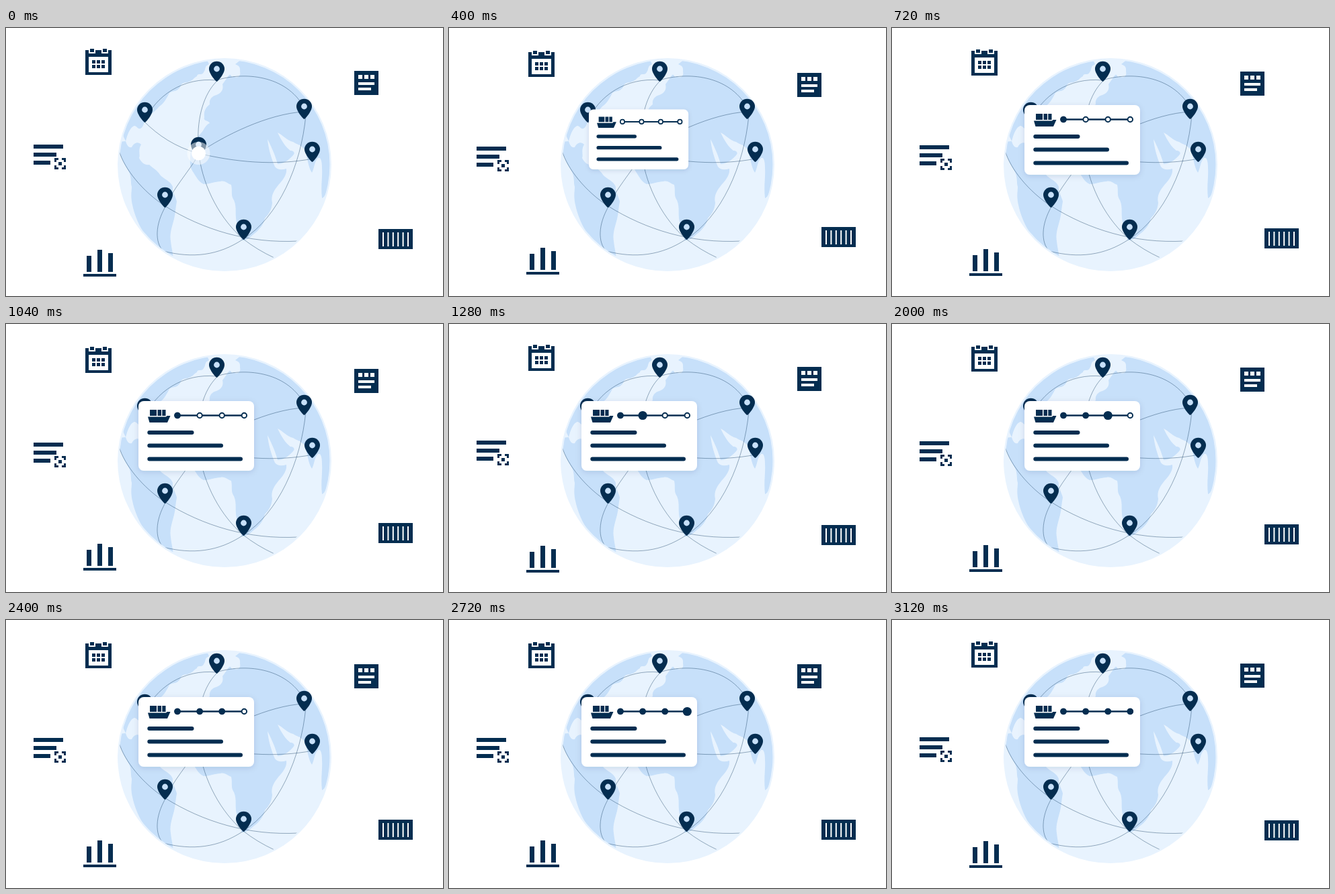
These frames come from a looping animation (650x400 px, 3.2 s). An HTML page:

```html
<!DOCTYPE html>
<html lang="en">
<head>
<meta charset="utf-8">
<title>Shipment tracking</title>
<style>
  html, body { margin: 0; width: 100%; height: 100%; overflow: hidden; background: #fff; }
  svg { display: block; width: 650px; height: 400px; }
  .navy { fill: #042d50; }
  .white { fill: #fff; }
  .land { fill: #c7e0fa; }
  .sea { fill: #e8f3fe; }
  .routes { fill: none; stroke: #042d50; stroke-width: .6; stroke-opacity: .65; }
  .bars { fill: none; stroke: #042d50; stroke-width: 6; stroke-linecap: round; }
</style>
</head>
<body>
<svg viewBox="0 0 650 400" xmlns="http://www.w3.org/2000/svg">
  <defs>
    <clipPath id="disc"><circle cx="325" cy="204" r="156.5"/></clipPath>
    <filter id="shadow" x="-20%" y="-20%" width="140%" height="150%">
      <feDropShadow dx="0" dy="2" stdDeviation="4" flood-color="#042d50" flood-opacity=".13"/>
    </filter>
    <g id="pin">
      <path class="navy" d="M0 18.7C-1.5 18.7-11.5 7-11.5-.2A11.5 11.3 0 0 1 11.5-.2C11.5 7 1.5 18.7 0 18.7Z"/>
      <circle class="land" r="4.4" cy="-.3"/>
    </g>
  </defs>

  <circle class="sea" cx="325" cy="204" r="159"/>
  <g clip-path="url(#disc)">
    <!-- Americas -->
    <path class="land" d="M178 169C181 158 184 150 189 147C193 143 196 152 200 150C206 147 204 140 209 136
      C214 128 222 125 228 117C236 112 239 104 243 97C248 93 254 96 259 88C262 79 268 83 272 80C278 79 279 74 284 72
      C285 66 291 72 294 66C298 61 294 58 302 54L296 40L220 50L160 130Z"/>
    <path class="land" d="M178 169C180 175 182 179 187 178C190 171 197 169 201 174C196 182 200 189 198 194
      C202 202 207 205 213 204C219 210 224 211 229 219C235 226 245 228 248 237C247 246 252 250 254 259
      C252 269 252 277 250 285C247 297 243 307 245 318C246 328 248 334 249 345L225 335C209 316 193 289 188 264
      C185 251 187 244 187 237C185 230 187 223 183 215C177 205 172 196 168 183L165 170Z"/>
    <!-- Europe, Africa and Asia -->
    <path class="land" d="M341 54C345 56 349 57 348 65C350 72 343 76 339 72C334 76 336 68 332 70
      C328 75 325 80 322 84C324 92 320 97 313 100C305 102 302 108 303 114C296 119 294 126 295 133
      C293 140 301 137 303 142C296 145 295 152 290 157C284 164 277 174 275 183C274 193 272 204 277 213
      C282 220 286 230 294 233C303 233 311 229 319 229C325 227 329 232 335 234C337 243 334 250 339 257
      C343 266 341 274 342 284C344 297 347 307 351 317C359 318 366 309 373 304C380 297 383 292 385 284
      C392 277 395 270 396 261C393 249 401 239 408 231C414 224 418 217 417 210C410 212 404 212 400 207
      C395 196 390 179 389 166C393 174 400 188 404 203C412 203 421 197 427 190C431 186 427 183 423 183
      C416 178 409 167 404 156C412 160 418 168 427 170C432 174 441 174 445 184C449 194 449 207 455 216
      C459 209 458 200 464 194C469 192 470 201 470 209C471 221 468 236 470 254C476 252 480 237 484 220
      L500 150L430 55L365 35Z"/>
    <g class="routes">
      <path d="M206 140C222 101 264 73 313 78C354 65 416 70 443 118"/>
      <path d="M313 80C295 98 284 132 286 172"/>
      <path d="M206 140C226 160 252 178 286 187"/>
      <path d="M286 187C325 160 390 128 443 125"/>
      <path d="M286 187C340 200 400 206 456 195"/>
      <path d="M286 190C270 217 248 240 237 267C222 293 221 320 234 333"/>
      <path d="M287 190C294 240 320 287 353 315C367 326 382 335 399 343"/>
      <path d="M446 130C439 206 405 282 353 315C316 340 277 344 234 333"/>
      <path d="M168 183C176 210 203 244 237 266C293 301 360 322 435 318"/>
    </g>
  </g>
  <g id="pins"></g>

  <g id="ripple" class="white">
    <circle id="halo" cx="286.5" cy="187" r="17"/>
    <circle id="core" cx="286.5" cy="187" r="10.5"/>
  </g>

  <g id="card">
    <rect class="white" x="197" y="115" width="172" height="104" rx="8" filter="url(#shadow)"/>
    <path class="navy" d="M214 128h10v9h-10zM225.500 128h5.500v9h-5.500zM232.300 128h5.200v9h-5.200z
      M211 138.500H238L239.500 137H244.500L240 147H213.500Z"/>
    <path class="bars" d="M213.300 162H276.500M213.300 181.500H320M213.300 201.500H349"/>
    <path d="M255 136.500H354" stroke="#042d50" stroke-width="2.300"/>
    <g id="stops"></g>
  </g>

  <g id="sinking" class="navy">
    <path d="M118 33h5v5h10v-5h9v5h10v-5h5v37h-39zM125 31h6v5h-6zM144 31h6v5h-6z"/>
    <path class="white" d="M123 43h29v23h-29z"/>
    <path d="M128 48h5v5h-5zM135 48h5v5h-5zM142 48h5v5h-5zM128 55h5v5h-5zM135 55h5v5h-5zM142 55h5v5h-5z"/>
    <path d="M518 64h36v36h-36z"/>
    <path class="white" d="M524 70h6v6h-6zM533 70h6v6h-6zM542 70h6v6h-6zM524 81h24v4h-24zM524 89h19v4h-19z"/>
    <path d="M41 174h44v6h-44zM41 186h34v6h-34zM41 198h25v6h-25zM78 200h5v5h-5z"/>
    <path d="M73.500 200v-4.500h4.500M83 195.500h4.500v4.500M87.500 205v4.500h-4.500M78 209.500h-4.500v-4.500"
      fill="none" stroke="#042d50" stroke-width="3"/>
  </g>
  <g id="rising" class="navy">
    <path d="M120 340h7v24h-7zM136 331h7v33h-7zM152 336h7v28h-7zM115 367h49v4h-49z"/>
    <path d="M554 300h51v30h-51z"/>
    <path d="M561 305v21M568.400 305v21M575.800 305v21M583.200 305v21M590.600 305v21M598 305v21"
      stroke="#fff" stroke-width="2"/>
  </g>
</svg>
<script>
const LOOP = 3200, STEP = 80;
const BOB = { period: 640, height: 4 };
const GROW = { start: 80, length: 423, x: 276, y: 161 };
const PULSE = { first: 560, gap: 720, half: 160 };
const STOP_R = 4.8, PEAK_R = 6.6;

const $ = id => document.getElementById(id);
const clamp = v => Math.min(1, Math.max(0, v));
const ease = v => (1 - Math.cos(Math.PI * clamp(v))) / 2;
const mix = (a, b, v) => a + (b - a) * v;

function add(parent, tag, attrs) {
  const node = document.createElementNS('http://www.w3.org/2000/svg', tag);
  set(node, attrs);
  return parent.appendChild(node);
}
function set(node, attrs) {
  for (const key in attrs) node.setAttribute(key, attrs[key]);
}

const pins = [[206.5, 122.3], [313.5, 61.3], [443.5, 117.3], [455.5, 181.3],
  [236.5, 249.3], [353.5, 297.3], [286.5, 174.3]];
for (const [x, y] of pins) add($('pins'), 'use', { href: '#pin', transform: `translate(${x} ${y})` });

const stops = [0, 1, 2, 3].map(i => {
  const at = { cx: 255 + i * 33.1, cy: 136.5 };
  add($('stops'), 'circle', { ...at, r: 3.7, fill: '#fff', stroke: '#042d50', 'stroke-width': 2 });
  return add($('stops'), 'circle', { ...at, class: 'navy' });
});

function stopRadius(t, i) {
  const v = (t - PULSE.first - i * PULSE.gap) / PULSE.half;
  return v < 0 ? mix(0, PEAK_R, ease(v + 1)) : mix(PEAK_R, STOP_R, ease(v));
}

function draw(t) {
  const phase = (t % BOB.period) / BOB.period;
  const shift = BOB.height * (1 - Math.abs(1 - 2 * phase));
  set($('sinking'), { transform: `translate(0 ${shift})` });
  set($('rising'), { transform: `translate(0 ${-shift})` });

  const scale = ease((t - GROW.start) / GROW.length);
  set($('card'), {
    transform: `translate(${GROW.x} ${GROW.y}) scale(${scale}) translate(${-GROW.x} ${-GROW.y})`,
    visibility: scale > 0 ? 'visible' : 'hidden'
  });

  set($('halo'), { r: mix(17, 24, clamp(t / 240)), opacity: mix(.5, 0, clamp(t / 240)) });
  set($('core'), { opacity: 1 - clamp((t - 80) / 240) });
  stops.forEach((stop, i) => set(stop, { r: stopRadius(t, i) }));
}

const start = performance.now();
function tick() {
  const t = (performance.now() - start) % LOOP;
  draw(Math.floor(t / STEP) * STEP);
  requestAnimationFrame(tick);
}
tick();
</script>
</body>
</html>
```
